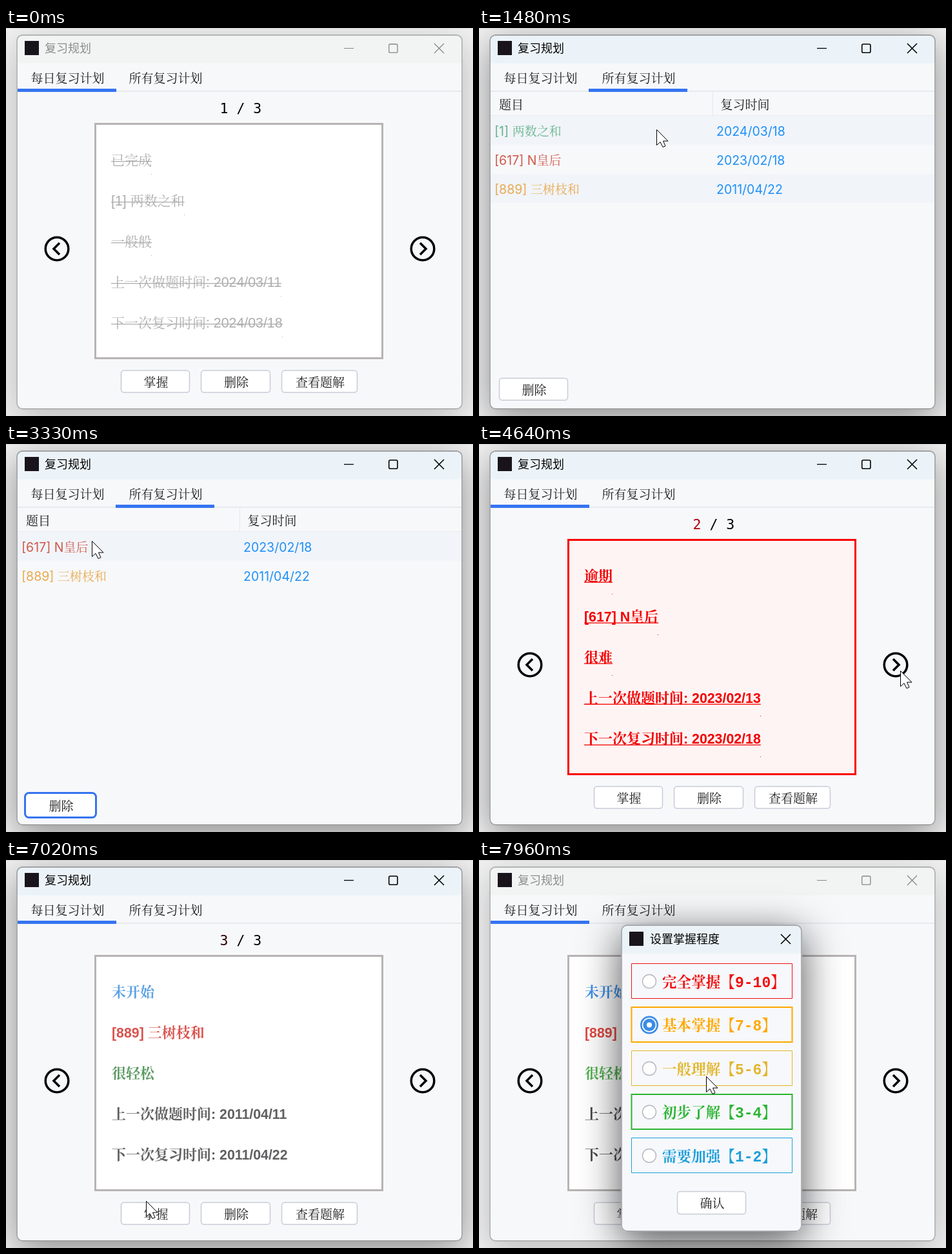
An HTML page with a canvas that plays this animation: 724x601 px, repeating every 7990 ms.

```html
<!DOCTYPE html>
<html lang="zh-CN">
<head>
<meta charset="utf-8">
<title>复习规划</title>
<style>
html, body { margin: 0; width: 100%; height: 100%; overflow: hidden; background: #f1f1f2; }
canvas { display: block; width: 724px; height: 601px; }
</style>
</head>
<body>
<canvas id="stage"></canvas>
<script>
const W = 724, H = 601, LOOP = 7990;
const canvas = document.getElementById('stage');
const dpr = window.devicePixelRatio || 1;
canvas.width = W * dpr;
canvas.height = H * dpr;
const ctx = canvas.getContext('2d');

const SONG = '"Noto Serif CJK SC", "Noto Sans CJK SC", "Noto Sans CJK", serif';
const HEI = '"Noto Sans CJK SC", "Noto Sans CJK", sans-serif';
const BLUE = '#3574f0', LOGO = '#19141c';

const UI = { latin: 'Inter, sans-serif', size: 19.5, han: SONG, hanSize: 19, color: '#1c1c1e' };
const TITLE = { latin: HEI, size: 18, han: HEI, hanSize: 18, color: '#000' };
const COUNT = { latin: '"DejaVu Sans Mono", monospace', size: 21.5, color: '#000' };
const PLAIN = { latin: '"Liberation Sans", Arial, sans-serif', size: 21.33, han: SONG, hanSize: 21 };
const BOLD = { ...PLAIN, hanSize: 22, weight: 600 };
const OPTION = { latin: '"Liberation Mono", monospace', size: 23, han: SONG, hanSize: 22.6, weight: 600 };

const CARDS = [
  { style: PLAIN, x: 163, border: '#b8b4b4', fill: '#fff', count: '#000', line: -6, dot: 14,
    colors: Array(5).fill('#aeaeae'),
    rows: ['已完成', '[1] 两数之和', '一般般', '上一次做题时间: 2024/03/11', '下一次复习时间: 2024/03/18'] },
  { style: BOLD, x: 163, border: '#f80000', fill: '#fff4f4', count: '#b0000c', line: 1.5, dot: 20,
    colors: Array(5).fill('#f20000'),
    rows: ['逾期', '[617] N皇后', '很难', '上一次做题时间: 2023/02/13', '下一次复习时间: 2023/02/18'] },
  { style: BOLD, x: 164, border: '#b8b4b4', fill: '#fff', count: '#2c0306',
    colors: ['#5ea2e4', '#d9534f', '#5c9a62', '#606062', '#606062'],
    vivid: ['#3f90e6', '#e04a42', '#50b050', '#48484a', '#48484a'],
    rows: ['未开始', '[889] 三树枝和', '很轻松', '上一次做题时间: 2011/04/11', '下一次复习时间: 2011/04/22'] }
];

const ITEMS = [
  ['[1] 两数之和', '2024/03/18', '#66b48c'],
  ['[617] N皇后', '2023/02/18', '#d0584a'],
  ['[889] 三树枝和', '2011/04/22', '#e9aa50']
];

const OPTIONS = [
  ['完全掌握【9-10】', '#f01010', 1],
  ['基本掌握【7-8】', '#ffa800', 2],
  ['一般理解【5-6】', '#e2b62c', 1],
  ['初步了解【3-4】', '#2db434', 2],
  ['需要加强【1-2】', '#1c9fda', 1]
];

// Pointer stops: time, x, y
const PATH = [
  [240, 656, -27], [830, 230, 80], [1000, 230, 80], [1320, 275, 157],
  [1980, 275, 157], [2700, 85, 561], [2980, 85, 561], [3330, 133, 150],
  [3650, 95, 71], [3820, 95, 71], [4610, 653, 351], [5930, 653, 351],
  [6710, 113, 534], [6740, 113, 534], [7010, 217, 528], [7340, 217, 528],
  [7440, 221, 541], [7610, 221, 541], [7960, 352, 335]
];
const ARROW = [[0, 0], [0, 24], [5.5, 19], [9.5, 27], [13.5, 25.3], [10, 17.6], [17.5, 17.6]];

const smooth = p => p * p * (3 - 2 * p);

function rect(x, y, w, h, fill) {
  ctx.fillStyle = fill;
  ctx.fillRect(x, y, w, h);
}

function shape(fill, stroke, width) {
  if (fill) { ctx.fillStyle = fill; ctx.fill(); }
  if (stroke) { ctx.strokeStyle = stroke; ctx.lineWidth = width; ctx.stroke(); }
}

function box(x, y, w, h, r, fill, stroke, width) {
  ctx.beginPath();
  ctx.roundRect(x, y, w, h, r);
  shape(fill, stroke, width);
}

function disc(x, y, r, fill, stroke, width) {
  ctx.beginPath();
  ctx.arc(x, y, r, 0, Math.PI * 2);
  shape(fill, stroke, width);
}

function line(points, color, width) {
  ctx.beginPath();
  points.forEach(([x, y]) => ctx.lineTo(x, y));
  shape(null, color, width);
}

const runs = s => s.match(/[\u2e80-\uffef]+|[^\u2e80-\uffef]+/g);

// Draws mixed Latin and Han runs, returns the right edge
function text(s, x, y, style, color = style.color) {
  ctx.fillStyle = color;
  for (const run of runs(s)) {
    const han = run[0] >= '\u2e80';
    ctx.font = `${style.weight || 'normal'} ${han ? style.hanSize : style.size}px ${han ? style.han : style.latin}`;
    ctx.fillText(run, x, y);
    x += ctx.measureText(run).width;
  }
  return x;
}

function button(x, y, w, h, label, focused) {
  if (focused) box(x - 1.5, y - 1.5, w + 3, h + 3, 6, '#fff', BLUE, 3);
  else box(x + .5, y + .5, w - 1, h - 1, 4.5, '#fff', '#c9ccd6', 1.5);
  text(label, x + w / 2 - label.length * UI.hanSize / 2 + 1, y + h / 2 + 8, UI);
}

function cross(x, y, color, width) {
  line([[x - 7.5, y - 7.5], [x + 7.5, y + 7.5]], color, width);
  line([[x + 7.5, y - 7.5], [x - 7.5, y + 7.5]], color, width);
}

// Framed window with shadow and title bar
function frame(x, y, w, h, barH, bar, body, border, shadow, blur) {
  ctx.save();
  ctx.shadowColor = shadow;
  ctx.shadowBlur = blur * dpr;
  ctx.shadowOffsetY = 14 * dpr;
  box(x, y, w, h, 9, body);
  ctx.restore();
  ctx.save();
  ctx.beginPath();
  ctx.roundRect(x, y, w, h, 9);
  ctx.clip();
  rect(x, y, w, barH, bar);
  ctx.restore();
  box(x + 1, y + 1, w - 2, h - 2, 8.5, null, border, 1.8);
}

function mainWindow(active, tab) {
  rect(0, 0, W, H, '#f2f2f3');
  rect(0, 0, W, 1, '#e0e1e5');
  frame(16, 10, 692, 581, 44.5, active ? '#ecf3f8' : '#f2f4f4', '#f7f8fa',
    active ? '#a2a3a5' : '#b2b3b4', active ? 'rgba(0,0,0,.42)' : 'rgba(0,0,0,.24)', 56);
  rect(29, 20, 22, 22, LOGO);
  text('复习规划', 60, 38, TITLE, active ? '#000' : '#8b8c8d');
  const ink = active ? '#000' : '#858687', lw = active ? 1.6 : 1.3;
  line([[524, 31.5], [539, 31.5]], ink, lw - .3);
  box(593.7, 25, 13.2, 13.2, 2, null, ink, lw);
  cross(671.5, 31.5, ink, lw);
  rect(18, 97, 688, 1.7, '#e6e7ec');
  rect(tab ? 170 : 18, 94, 153, 5, BLUE);
  text('每日复习计划', 38.5, 85, UI);
  text('所有复习计划', 190.5, 85, UI);
}

function table(items, selected, focused) {
  rect(362, 99, 1, 36, '#e7e8ed');
  rect(18, 135, 688, 1, '#e9ebf0');
  text('题目', 31, 126, UI);
  text('复习时间', 374.5, 126, UI);
  items.forEach(([name, date, color], i) => {
    const y = 136 + i * 45;
    if (i % 2 === 0) rect(18, y, 688, 45, selected && i === 0 ? '#d4e2ff' : '#f1f4f9');
    text(name, 24, y + 31, UI, color);
    text(date, 368, y + 31, UI, '#1e90f8');
  });
  button(31, 542, 107, 35, '删除', focused);
}

function arrow(x, dir) {
  disc(x, 342, 17.8, null, '#000', 3.5);
  line([[x - 4 * dir, 333], [x + 5 * dir, 342], [x - 4 * dir, 351]], '#000', 3.5);
}

function card(page, vivid) {
  const c = CARDS[page];
  const end = text(String(page + 1), 331.5, 132, COUNT, c.count);
  text(' / 3', end, 132, COUNT);
  box(138.5, 148.5, 445, 363, 0, c.fill, c.border, 3);
  const colors = vivid && c.vivid || c.colors;
  c.rows.forEach((s, i) => {
    const y = 212 + i * 63, right = text(s, c.x, y, c.style, colors[i]);
    if (!c.dot) return;
    rect(c.x, y + c.line, right - c.x, 1.3, colors[i]);
    rect(Math.round(right) - 1, y + c.dot, 1, 1, colors[i]);
  });
  arrow(79, -1);
  arrow(646, 1);
  button(178, 530, 107, 35, '掌握');
  button(302, 530, 108, 35, '删除');
  button(427, 530, 118, 35, '查看题解');
}

function dialog(t) {
  const p = Math.min(1, Math.max(0, (Math.floor((t - 7390) / 40) * 40 - 10) / 110));
  const rest = (1 - p) ** 2, scale = 1 - .275 * rest;
  ctx.save();
  ctx.globalAlpha = 1 - rest * rest;
  ctx.translate(268, 298);
  ctx.scale(scale, scale);
  ctx.translate(-268, -298);
  frame(220, 100, 281, 476, 45, p < 1 ? '#f2f3f4' : '#ecf3f8', '#f7f8fb', '#a4a7aa', 'rgba(0,0,0,.68)', 62);
  rect(233, 111, 22, 22, LOGO);
  text('设置掌握程度', 265, 129, TITLE);
  cross(475.5, 122.5, '#000', 1.6);
  OPTIONS.forEach(([label, color, lw], i) => {
    const y = 160.5 + i * 67.5, mid = y + 27.5;
    box(236.5, y, 249, 54, 0, null, color, lw);
    if (i === 1) {
      disc(264, mid, 14, '#3b8de6');
      disc(264, mid, 10.5, null, '#fff', 1.6);
      disc(264, mid, 4, '#fff');
    } else disc(264, mid, 10.5, '#fff', '#b6b7bf', 1.4);
    text(label, 284, mid + 8.5, OPTION, color);
  });
  button(307, 513, 107, 36, '确认');
  ctx.restore();
}

function pointer(t) {
  if (t < PATH[0][0]) return;
  let [, x, y] = PATH[PATH.length - 1];
  const k = PATH.findIndex(stop => stop[0] > t);
  if (k > 0) {
    const [t0, x0, y0] = PATH[k - 1], [t1, x1, y1] = PATH[k];
    const p = smooth((t - t0) / (t1 - t0));
    x = x0 + (x1 - x0) * p;
    y = y0 + (y1 - y0) * p;
  }
  ctx.beginPath();
  ARROW.forEach(([dx, dy]) => ctx.lineTo(x + dx + .5, y + dy + .5));
  ctx.closePath();
  shape('#fff', '#000', 1);
}

function draw(t) {
  ctx.setTransform(dpr, 0, 0, dpr, 0, 0);
  const modal = t >= 7400;
  const list = t >= 980 && t < 3690;
  mainWindow(t >= 980 && !modal, list);
  if (list) {
    const removed = t >= 2780;
    table(removed ? ITEMS.slice(1) : ITEMS, t >= 1600 && !removed, removed);
  } else card(t < 4640 ? 0 : t < 5210 ? 1 : 2, modal);
  if (modal) dialog(t);
  pointer(t);
}

const start = performance.now();
function tick() {
  draw((performance.now() - start) % LOOP);
  requestAnimationFrame(tick);
}
tick();
</script>
</body>
</html>
```
